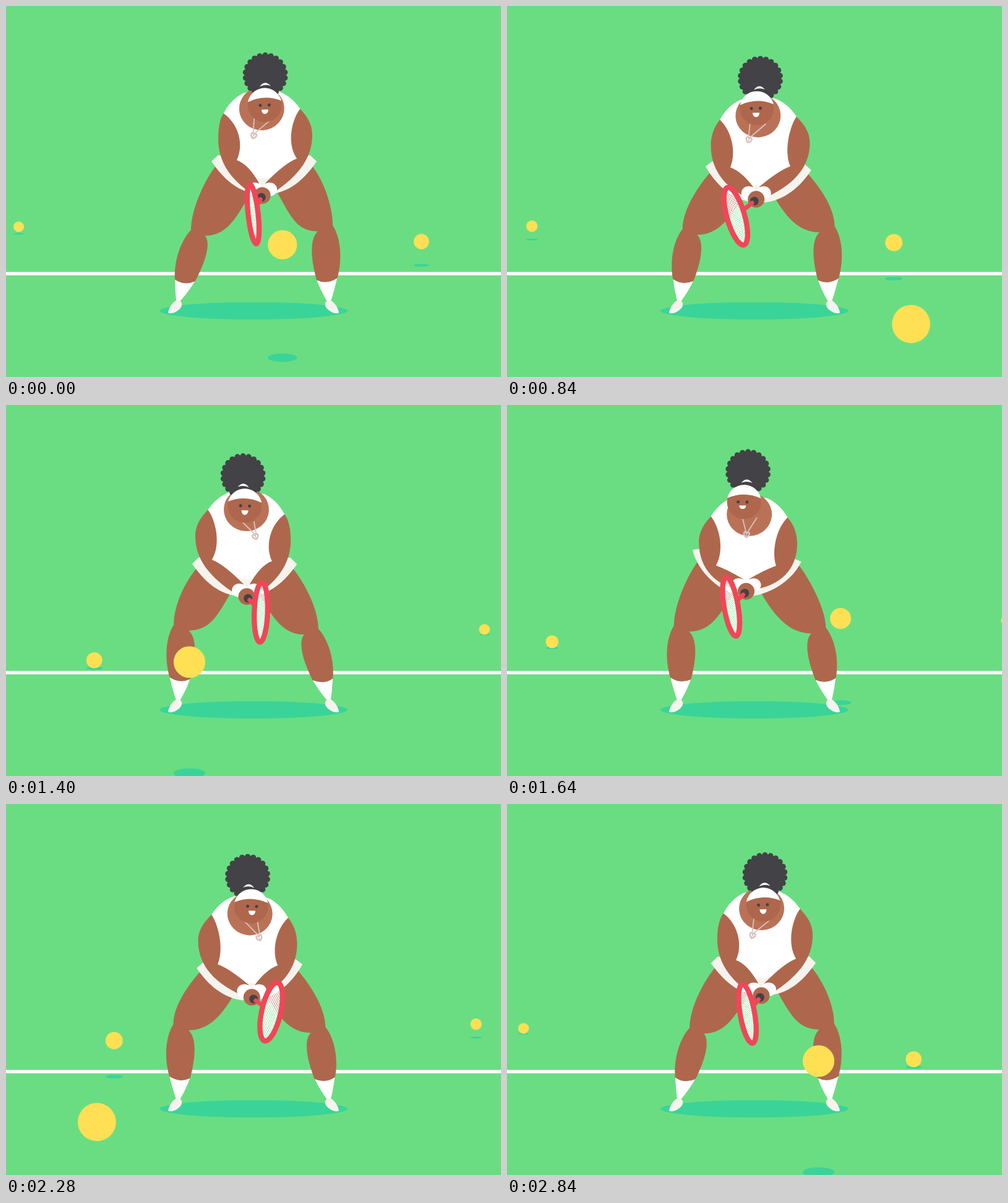
Write an HTML page with a canvas that moves like this. It is 800 px wide and 600 px high and loops after 2880 ms.

```html
<!DOCTYPE html>
<html lang="en">
<head>
<meta charset="utf-8">
<title>Tennis player</title>
<style>
html, body { margin: 0; width: 100%; height: 100%; overflow: hidden; background: #6add82; }
canvas { display: block; }
</style>
</head>
<body>
<canvas id="stage" width="800" height="600"></canvas>
<script>
const ctx = document.getElementById('stage').getContext('2d');
const PERIOD = 960, HALF = PERIOD / 2, TAU = Math.PI * 2;
const COLOR = {
  court: '#6add82', shadow: '#3ad498', ball: '#ffe055', skin: '#ae674d', chest: '#ba7257',
  hair: '#434246', white: '#fff', cream: '#f6f3ee', red: '#f14657', chain: '#d9c3bd'
};

function fill(color, path) {
  ctx.fillStyle = color;
  ctx.fill(new Path2D(path));
}

function ellipse(color, x, y, rx, ry = rx) {
  ctx.fillStyle = color;
  ctx.beginPath();
  ctx.ellipse(x, y, rx, ry, 0, 0, TAU);
  ctx.fill();
}

function stroke(color, width, path) {
  ctx.strokeStyle = color;
  ctx.lineWidth = width;
  ctx.stroke(new Path2D(path));
}

function at(x, y, angle, draw) {
  ctx.save();
  ctx.translate(x, y);
  ctx.rotate(angle);
  draw();
  ctx.restore();
}

// The body sways once and bobs twice per period.
function poseAt(t) {
  const w = TAU * t / PERIOD;
  const wave = (n, mid, c, s) => mid + c * Math.cos(n * w) + s * Math.sin(n * w);
  const sway = (mid, c, s) => wave(1, mid, c, s);
  const bob = (mid, c, s) => wave(2, mid, c, s);
  return {
    torso: { x: sway(400, 13.5, 5.2), y: bob(177, -7, -4.5), roll: sway(0, -.06, 0) },
    hips: {
      x: sway(400, 17, 8.2), y: bob(250.5, 1, -12), depth: bob(59, -5.5, 3.5),
      roll: sway(0, 0, -.084) + wave(3, 0, 0, .035)
    },
    head: { x: sway(400, 18, 12.8), y: bob(160, .5, -5.5), turn: sway(0, 0, 2.3), smile: bob(6.4, .6, -.6) },
    hair: { x: sway(400, 19, 5.8), y: bob(111.3, .5, -6) },
    pendant: { x: sway(400, 0, 13.3), y: bob(211.2, -1.2, -5.3) },
    hand: { x: sway(400, 14, 10.3), y: bob(305.5, 1, -7) },
    elbow: { x: sway(351.5, 21.5, 8.5), y: bob(255.5, -7.5, -4.8) + sway(0, 1.2, 0) },
    bicep: sway(321.7, 19, 5.8) + bob(0, 2.3, 1.7),
    knee: { x: sway(280.2, 13.5, 4.2) + bob(0, 5.2, 3.2), y: sway(358.5, 3.5, .6) }
  };
}

function drawLeg({ knee, hips }) {
  const lean = (knee.x - 268.5) / 120;
  ctx.save();
  ctx.transform(1, 0, -lean, (478 - knee.y) / 120, 278.5, 478);
  fill(COLOR.white, 'M-15 -38 Q-8 -12 -3.5 -1 H3 Q13 -18 18.5 -35 Z');
  fill(COLOR.skin, 'M-10 -120 C-24 -98 -23 -62 -15 -37 Q2 -26 18.5 -34 C24 -55 32 -98 13 -112 Z');
  ctx.restore();
  fill(COLOR.cream, 'M262 496 C263 489 269 478 277 475.5 C283 476 286 481 283 487 C280 492 271 498 264 497 Z');

  const startX = hips.x - 68, startY = hips.y - 4, { x, y } = knee;
  fill(COLOR.skin, `M${startX} ${startY} C${startX - 27} ${startY + 27} ${x} ${y - 32} ${x} ${y}
    Q${x + 12} ${y + 10} ${x + 22} ${y + 9.5}
    C${x + 57} ${y + 10} ${hips.x - 45} 345 ${hips.x - 18} 295 L${hips.x} ${startY} Z`);
}

function drawArm({ torso, bicep, elbow, hand }) {
  const sx = torso.x - 62 * Math.cos(torso.roll), sy = torso.y - 62 * Math.sin(torso.roll);
  const by = sy + 42;
  fill(COLOR.skin, `M${sx} ${sy} C${sx - 5} ${sy + 6} ${bicep} ${by - 22} ${bicep} ${by}
    C${bicep} ${by + 35} ${bicep + 19} ${by + 65} ${hand.x - 16} ${hand.y - 3}
    L${hand.x - 5} ${hand.y - 20}
    Q${elbow.x + 19} ${elbow.y + 7} ${elbow.x} ${elbow.y}
    C${bicep + 42} ${elbow.y - 25} ${bicep + 33} ${sy + 17} ${sx} ${sy} Z`);
}

function bothSides(t, draw) {
  draw(poseAt(t));
  ctx.save();
  ctx.transform(-1, 0, 0, 1, 800, 0);
  draw(poseAt(t + HALF));
  ctx.restore();
}

// The deeper the skirt swings, the wider and fuller it gets.
function drawSkirt({ x, y, roll, depth }) {
  const half = 70 + depth * .28, full = depth * 1.3 - 9, rim = depth * .6 - 42;
  at(x, y, roll, () => fill(COLOR.cream, `M${-half} 0 L${10.5 - half} ${rim} H${half - 10.5} L${half} 0
    C${full} 36 34 ${depth} 0 ${depth} S${-full} 36 ${-half} 0 Z`));
}

function drawTorso({ torso, head, pendant }) {
  at(torso.x, torso.y, torso.roll, () => {
    fill(COLOR.white, `M-62 0 Q-48 -23 -27 -31 H27 Q48 -23 62 0 L58 45 L54 80
      Q42 106 18 108 H-18 Q-42 106 -54 80 L-58 45 Z`);
    ellipse(COLOR.chest, 0, -4, 36.5, 35);
  });
  const { x, y } = pendant, top = head.y + 20;
  stroke(COLOR.chain, 1.8, `M${torso.x - 12.5} ${top} L${x - .5} ${y - 3}
    M${torso.x + 12.5} ${top + 5} L${x + 1} ${y - 3}`);
  at(x, y, (torso.x - x) * .025, () =>
    stroke(COLOR.chain, 2.6, 'M0 4.5 C-6 1 -5 -4 -2.5 -4 Q-.5 -4 0 -2 Q.5 -4 2.5 -4 C5 -4 6 1 0 4.5 Z'));
}

function drawHead({ head, hair, torso }) {
  const bumps = 22;
  ellipse(COLOR.hair, hair.x, hair.y, 33.5);
  for (let i = 0; i < bumps; i++) {
    const a = TAU * i / bumps - Math.PI / 2;
    ellipse(COLOR.hair, hair.x + 32 * Math.cos(a), hair.y + 32 * Math.sin(a), 4.6);
  }
  at(hair.x * .7 + head.x * .3, hair.y + 16, torso.roll, () =>
    fill(COLOR.white, 'M-9 2 Q0 -9 9 2 Q0 -2 -9 2 Z'));

  at(head.x, head.y, torso.roll * .7, () => {
    ellipse(COLOR.skin, 0, 0, 27.5);
    ctx.fillStyle = COLOR.white;
    ctx.beginPath();
    ctx.arc(0, 0, 27.8, Math.PI + .22, -.22);
    ctx.quadraticCurveTo(0, -18, -27.1, -6);
    ctx.fill();
    ctx.translate(head.turn, 0);
    ellipse(COLOR.hair, -7.2, 0, 2.5);
    ellipse(COLOR.hair, 7.2, 0, 2.5);
    const lip = head.smile, chin = lip * 2.35;
    fill(COLOR.white, `M-5.5 ${lip} H5.5 C5.5 ${chin} -5.5 ${chin} -5.5 ${lip} Z`);
  });
}

// Time, angle in degrees, half width, and centre relative to the grip.
const SWING = [
  [0, -6, 12.3, -13.5, 27], [200, -72, 14.5, 19.5, 27], [360, -167, 19.5, 28.5, 20.5],
  [460, -174, 14, 18, 23], [560, -110, 12, -2, 26], [680, -10, 15.5, -22, 22],
  [840, -16, 18.5, -30, 24.5], [920, -10, 16, -20.5, 26.5]
];

// Smooth periodic interpolation through the keys.
function swingAt(t) {
  const n = SWING.length;
  const key = (i, k) => SWING[(i + n) % n][k] + (k ? 0 : Math.floor(i / n) * PERIOD);
  const i = SWING.findLastIndex(k => k[0] <= t);
  const span = key(i + 1, 0) - key(i, 0), u = (t - key(i, 0)) / span;
  const slope = (j, k) => (key(j + 1, k) - key(j - 1, k)) / (key(j + 1, 0) - key(j - 1, 0)) * span;
  return [1, 2, 3, 4].map(k =>
    key(i, k) * (1 + 2 * u) * (1 - u) ** 2 + slope(i, k) * u * (1 - u) ** 2 +
    key(i + 1, k) * u * u * (3 - 2 * u) + slope(i + 1, k) * u * u * (u - 1));
}

function drawRacket(t, hand) {
  const [angle, halfWidth, dx, dy] = swingAt(t);
  const x = hand.x + dx * .1, y = hand.y + 3;
  ellipse(COLOR.hair, x, y, 7);
  ctx.lineCap = 'round';
  stroke(COLOR.red, 7, `M${x + dx * .12} ${y + dy * .12} L${x + dx * .5} ${y + dy * .5}`);
  ctx.lineCap = 'butt';

  at(x + dx, y + dy, angle * Math.PI / 180, () => {
    const rx = halfWidth - 4.2, ry = 48.3;
    ctx.save();
    ctx.beginPath();
    ctx.ellipse(0, 0, rx, ry, 0, 0, TAU);
    ctx.clip();
    ctx.scale(rx / ry, 1);
    let strings = '';
    for (let p = -100; p <= 100; p += 4.4) {
      strings += `M-50 ${p - 18} L50 ${p + 18} M${p - 18} 50 L${p + 18} -50`;
    }
    stroke(COLOR.white, 2.1, strings);
    ctx.restore();
    ctx.strokeStyle = COLOR.red;
    ctx.lineWidth = 8.4;
    ctx.beginPath();
    ctx.ellipse(0, 0, rx, ry, 0, 0, TAU);
    ctx.stroke();
  });
}

// A ball flies off into the distance: size falls with depth, position follows size.
function ballAt(age) {
  const r = 1 / (.0323 + 8.4e-5 * age - 5e-9 * age * age);
  let height = .95;
  if (age < 560) {
    height += (560 - age) * (age + 100) * 7e-5;
  } else {
    const bounce = (age - 560) / 240, n = Math.floor(bounce), u = bounce - n;
    height += 3.8 * .42 ** n * 4 * u * (1 - u);
  }
  const ground = 255 + 13.3 * r;
  return { x: 28.3 * r - 220.8, y: ground - height * r, r, ground };
}

function eachBall(t, draw) {
  for (const mirrored of [false, true]) {
    const start = mirrored ? 360 : 840;
    const phase = (t - start + 100 + PERIOD) % PERIOD - 100;
    for (const age of [phase + PERIOD, phase]) {
      const ball = ballAt(age);
      if (mirrored) ball.x = 800 - ball.x;
      draw(ball);
    }
  }
}

function render(now) {
  const t = now % PERIOD, pose = poseAt(t), { hand } = pose;
  ctx.fillStyle = COLOR.court;
  ctx.fillRect(0, 0, 800, 600);
  ctx.fillStyle = COLOR.white;
  ctx.fillRect(0, 430, 800, 5.5);
  ellipse(COLOR.shadow, 400, 493, 152, 14);
  eachBall(t, b => ellipse(COLOR.shadow, b.x, b.ground, b.r, b.r * (.08 + .009 * b.r)));

  bothSides(t, drawLeg);
  drawSkirt(pose.hips);
  drawTorso(pose);
  drawHead(pose);
  bothSides(t, drawArm);
  ellipse(COLOR.white, hand.x - 12, hand.y - 10, 12, 11);
  ellipse(COLOR.white, hand.x + 12, hand.y - 10, 12, 11);
  ellipse(COLOR.skin, hand.x, hand.y, 13.5);
  drawRacket(t, hand);
  eachBall(t, b => ellipse(COLOR.ball, b.x, b.y, b.r));
}

const begin = performance.now();
function tick() {
  render(performance.now() - begin);
  requestAnimationFrame(tick);
}
tick();
</script>
</body>
</html>
```
